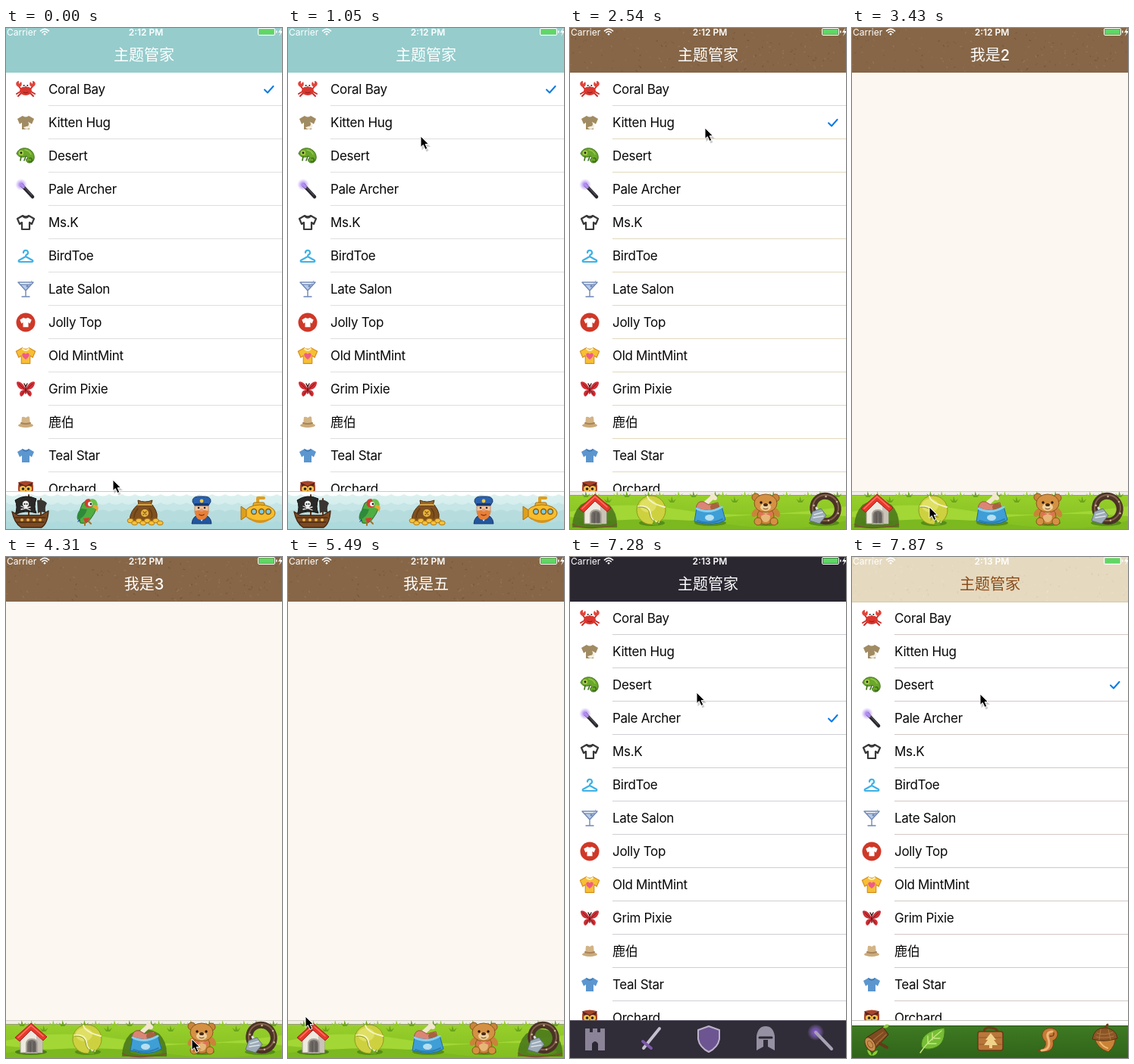
An HTML page for the animation above (8000 ms loop, 364 by 662 pixels).

```html
<!DOCTYPE html>
<html lang="zh">
<head>
<meta charset="utf-8">
<title>主题管家</title>
<style>
html, body { margin: 0; width: 364px; height: 662px; overflow: hidden; background: #fff; }
svg { display: block; font-family: Inter, "Noto Sans CJK SC", "Noto Sans CJK JP", sans-serif; }
.row { font-size: 17px; letter-spacing: -.3px; fill: #080808; }
.title { font-size: 20px; font-weight: 500; text-anchor: middle; }
.clock { font-size: 12px; font-weight: 600; text-anchor: middle; }
</style>
</head>
<body>
<script>
const LOOP = 8000;
const TABS = [33, 107, 183, 258, 333];

// Shape helpers
const p = (d, fill, more = '') => `<path d="${d}" fill="${fill}" ${more}/>`;
const s = (d, color, w = 1, more = '') =>
  p(d, 'none', `stroke="${color}" stroke-width="${w}" stroke-linecap="round" stroke-linejoin="round" ${more}`);
const e = (x, y, rx, ry, fill, more = '') => `<ellipse cx="${x}" cy="${y}" rx="${rx}" ry="${ry}" fill="${fill}" ${more}/>`;
const c = (x, y, r, fill, more) => e(x, y, r, r, fill, more);
const r = (x, y, w, h, fill, more = '') => `<rect x="${x}" y="${y}" width="${w}" height="${h}" fill="${fill}" ${more}/>`;
const g = (x, y, body, k = 1) => `<g transform="translate(${x} ${y}) scale(${k})">${body}</g>`;
const group = (id, body) => `<g id="${id}">${body}</g>`;
const ink = (color, w = 1) => `stroke="${color}" stroke-width="${w}" stroke-linejoin="round"`;
const fade = (id, a, b) => `<linearGradient id="${id}" x2="0" y2="1"><stop stop-color="${a}"/><stop offset="1" stop-color="${b}"/></linearGradient>`;

let seed = 7;
const rnd = n => (seed = (seed * 16807) % 2147483647) / 2147483647 * n;
const many = (n, make) => Array.from({ length: n }, (_, i) => make(i)).join('');

const TEE = 'M-4-9Q0-6 4-9L11-5 8 2 5 0V9H-5V0L-8 2-11-5Z';
const HEART = 'M0 5C-9-1-3-6 0-2 3-6 9-1 0 5Z';

const rows = [
  ['Coral Bay',
    s('M-7 3l-5 3M-6 5l-4 4M7 3l5 3M6 5l4 4M-6 0l-4-5M6 0l4-5', '#c92d28', 2) +
    p('M-9-3C-15-5-13-11-9-11L-9-7-6-10C-4-6-6-3-9-3Z', '#e0443a') +
    p('M9-3C15-5 13-11 9-11L9-7 6-10C4-6 6-3 9-3Z', '#e0443a') +
    e(0, 2, 8, 6, '#d8372f') + c(-2.5, -5, 2, '#fff') + c(2.5, -5, 2, '#fff') +
    c(-2.3, -5, 1, '#222') + c(2.3, -5, 1, '#222') + s('M-3 4Q0 6 3 4', '#8c1a18')],
  ['Kitten Hug', p(TEE, '#a18b62') + p('M3-1A5 5 0 1 1-3 6 6 6 0 0 0 3-1Z', '#f4eee0') + c(1, 2, 3, '#a18b62')],
  ['Desert',
    p('M-12-3C-9-12 3-12 8-6 13-1 12 8 6 9 0 10-1 3 3 3L1 0C-4 3-9 2-12-3Z', '#6aa72a', ink('#3c6e1a')) +
    s('M5 3a2.5 2.5 0 1 1-1 4M-6 1l-1 5M0 1l-2 5', '#3c6e1a', 1.6) +
    c(-6, -4, 3.2, '#a7cf4a') + c(-6, -4, 1.4, '#222') + s('M-1-8Q5-7 7-2', '#96c84a', 1.5)],
  ['Pale Archer',
    c(-6, -6, 8, 'url(#glow)') + s('M-5-5L9 10', '#29272e', 4.5) + s('M-6-6l3 3', '#b18cf0', 4) + s('M-2-3L8 8', '#68646f')],
  ['Ms.K', p(TEE, '#fff', ink('#38383b', 2.2)) + s('M-4-8Q0-4 4-8', '#38383b', 1.6)],
  ['BirdToe', s('M-3-4a3 3 0 1 1 4 2.6Q0-1 0 1L-9 6Q-10 8-8 8H8Q10 8 9 6L0 1', '#3eb1e6', 2.2)],
  ['Late Salon',
    p('M-6-5H6L0 2Z', '#b7cbe9') + s('M-10-9H10L0 2ZM0 2V9M-5 10H5M-7-6H7', '#6f88b7', 1.4) +
    s('M3-3L8-11', '#8da5cc') + c(2, -4, 1.5, '#6f88b7')],
  ['Jolly Top', c(0, 0, 12.5, '#cf3828') + g(0, 0, p(TEE, '#fff'), .7)],
  ['Old MintMint', g(0, 0, p(TEE, '#f7bf35', ink('#d58d1c')), 1.15) + s('M-4-9Q0-5 4-9', '#fff2b8', 2) + p(HEART, '#ef5b8a')],
  ['Grim Pixie',
    p('M0 0C-4-9-10-11-12-9-12-3-8 1-2 1-9 2-9 8-6 10-3 9-1 5 0 2 1 5 3 9 6 10 9 8 9 2 2 1 8 1 12-3 12-9 10-11 4-9 0 0Z', '#cf2f35') +
    s('M-9-7L-2 0M9-7L2 0M-5 7l3-4M5 7l-3-4', '#7d1820') + s('M0-3V6M0-3l-2-4M0-3l2-4', '#3a1414', 1.4)],
  ['鹿伯', p('M-6 3L-5-7Q-2-8 0-6 3-9 5-7L6 3Z', '#d3b486') + e(0, 4, 10, 3, '#cbaa7a') + s('M-6 1Q0 3 6 1', '#a88456', 2)],
  ['Teal Star', p(TEE, '#5c96cf') + s('M-4-8Q0-4 4-8', '#3f77b2', 1.4)],
  ['Orchard',
    p('M-9-9Q0-12 9-9 12 2 7 10H-7Q-12 2-9-9Z', '#a8432a') + p('M-10-9L0-4 10-9 7-2H-7Z', '#5c2420') +
    c(-4, 0, 4, '#f6c04e') + c(4, 0, 4, '#f6c04e') + c(-3.5, 0, 1.8, '#222') + c(3.5, 0, 1.8, '#222') + p('M-2 3H2L0 7Z', '#f09a2c')]
];

const surfIcons = [
  s('M-3-20V9M13-15V8', '#5b3518', 2) + p('M-21-13Q-8-22 7-15 3-4 7 4-8-1-21 6-17-4-21-13Z', '#2b2927', ink('#121110')) +
  p('M8-13Q16-15 21-9 17-3 20 4 14 1 9 4Z', '#393532') +
  c(-7, -8, 4.2, '#eee') + r(-9, -5, 4, 3, '#eee') + c(-8.5, -8, 1.1, '#222') + c(-5.5, -8, 1.1, '#222') + s('M-13-1L-1-4M-13-5L-1 0', '#eee', 1.3) +
  p('M-25 2L-17 7H13L23 1Q22 18 14 23H-13Q-22 17-25 2Z', '#7b4a22', ink('#43250e', 1.3)) +
  s('M-21 10H19M-18 16H17', '#4d2c12', 1.3) + many(4, i => c(-12 + i * 8, 13, 2, '#e6ae4a')),
  p('M-8 6L-13 16-5 13Z', '#2c62a0') + p('M-6-9Q5-19 12-8 14-1 5 11 0 19-9 17-13 5-6-9Z', '#50ad40', ink('#276c29')) +
  p('M3-14Q13-17 14-6L7-7Z', '#6bc24b') + p('M-8-2Q-15 5-13 13-3 10 0-1Z', '#2f8a3a') +
  p('M8-7Q18-8 13 3 12-3 7-3Z', '#e7a62f') + p('M-3-6Q-5-15 3-15L7-6Q2-1-3-6Z', '#d93b30') +
  c(4, -8, 3, '#fff') + c(5, -8, 1.4, '#222') + p('M-5 11L4 10-2 18Z', '#d93b30') + s('M2 15l3 3M-3 17v3', '#a87222', 2),
  p('M-8-8Q-19 0-20 13-7 20 14 15 20 6 10-7Z', '#80501f', ink('#523110')) + p('M-9-13Q0-9 10-13L8-6H-8Z', '#96642c', ink('#523110')) +
  s('M-9-7H9', '#d2a34c', 2) + s('M-9-2Q-14 4-14 10M6-2Q11 4 9 10', '#653c14', 1.5) +
  c(0, 4, 5, '#e9b63c') + s('M-2 2l4 4M2 2l-4 4', '#8a5a16', 1.3) +
  many(8, i => e(-19 + i * 5.6, 14 + (i % 2) * 3, 4, 2.8, '#f5c238', ink('#b57b16'))),
  p('M-13 18Q-12 6 0 6T13 18Z', '#24569c', ink('#173a70')) + p('M-4 8H4L0 15Z', '#fff') +
  p('M-9-8H9V3Q7 11 0 11T-9 3Z', '#f4c39b', ink('#b67a53', .8)) + p('M-9 1Q0-1 9 1 8 12 0 13T-9 1Z', '#e78036') +
  p('M-12-11Q-13-19 0-18 13-19 12-11L9-6H-9Z', '#2b62ae', ink('#173a70')) + r(-9, -9, 18, 3, '#173a70') + c(0, -12, 2.4, '#f3c642') +
  c(-4, -3, 1.3, '#222') + c(4, -3, 1.3, '#222') + e(0, 0, 2.5, 2, '#e69a76') + s('M-3 6Q0 8 3 6', '#842f1c', 1.5),
  s('M-1-8V-16H7', '#df9f1d', 4) + r(-7, -10, 15, 10, '#edb126', ink('#a8700f') + ' rx="2"') +
  e(2, 4, 20, 11, '#f7bd2c', ink('#a8700f')) + p('M-16 0L-23-5V13L-16 8Z', '#df9f1d', ink('#a8700f')) +
  p('M-14 9Q2 18 19 9 12 17 2 17T-14 9Z', '#d7931b') + [-6, 4, 13].map(x => c(x, 2, 3.4, '#81cbe2', ink('#8c5b0b', 1.5))).join('')
];

const yardIcons = [
  e(0, 17, 21, 4, '#4c7d18') + p('M-14-4L0-15 15-4V18H-14Z', '#eee9df', ink('#a29a8d')) + p('M7-8L15-4V18H7Z', '#c9c3b8') +
  p('M-6 18V7Q-6 0 1 0T8 7V18Z', '#706b66', ink('#aaa59b', 2)) + s('M-1 4V17M4 4V17', '#514d49') +
  p('M0-21L21-3 16 2 0-12-15 3-21-2Z', '#e8382d', ink('#a51f1b')) + s('M-17-2L0-18 16-4', '#ff7762', 1.5),
  e(1, 17, 17, 4, '#568d17') + c(0, 0, 19, '#ced13f', ink('#8d981d')) + e(-4, -6, 11, 9, '#dfe063') +
  s('M-17-5Q-2-7-1 4T10 16M-5-18Q-2-9 18-4', '#f4f3c5', 2) + s('M-17-4Q-3-5-2 5T9 17', '#8e9926') +
  p('M1 20L4 12 6 18 10 13 9 21Z', '#68a51c'),
  e(2, 17, 21, 4, '#568d17') + s('M-4-9L6-18', '#f2e7cf', 6) + c(5, -19, 3, '#f2e7cf') + c(8, -16, 3, '#f2e7cf') +
  p('M-17-1Q-16-13-7-11L0-7 12-10 15 2Z', '#db8574', ink('#a45348')) + e(8, -4, 6, 5, '#a9623e') +
  p('M-16-3Q0 5 17-5L22 13Q7 23-19 15Z', '#3f9ed5', ink('#206a9c')) + s('M-16-2Q0 6 17-4', '#87d0ef', 3) +
  e(1, 10, 6, 4, '#b6dff0') + s('M-15 14Q2 20 18 12', '#2b7fb4', 2),
  e(1, 17, 16, 4, '#568d17') + c(-13, -17, 5, '#c98439', ink('#8c541d')) + c(13, -16, 5, '#c98439', ink('#8c541d')) +
  e(-13, 3, 4, 7, '#c98439', 'transform="rotate(40 -13 3)"') + e(14, 3, 4, 7, '#c98439', 'transform="rotate(-35 14 3)"') +
  e(0, 8, 11, 11, '#c98439', ink('#8c541d')) + e(0, 9, 6, 7, '#e6b777') +
  e(0, -9, 15, 12, '#d59143', ink('#8c541d')) + e(0, -4, 7, 5, '#efd09c') + e(0, -7, 3, 2, '#482a15') +
  c(-6, -10, 1.7, '#24150a') + c(6, -10, 1.7, '#24150a') + s('M-3-2Q0 0 3-2', '#754319') +
  p('M-8 2L0 5 9 2 8 8 0 5-7 8Z', '#e2705b') + c(-10, 15, 5, '#d59143', ink('#8c541d')) + c(11, 15, 5, '#d59143', ink('#8c541d')),
  e(2, 17, 20, 4, '#568d17') + e(4, -2, 16, 17, 'none', 'stroke="#4b3226" stroke-width="9" transform="rotate(-28 4 -2)"') +
  e(4, -3, 17, 17, 'none', 'stroke="#80604a" stroke-width="2" transform="rotate(-28 4 -3)"') +
  many(6, i => c(5 + 17 * Math.cos(i - 1.6), -2 + 16 * Math.sin(i - 1.6), 1.3, '#c6b28f')) +
  s('M-8-3L-6 1', '#ddd', 3) + p('M-13 2L-2-2 5 7-4 18-17 14Z', '#9cabb7', ink('#64717c')) + s('M-11 6L0 3M-12 10L1 8', '#dce4e9', 1.4)
];

const duskIcons = [
  p('M-13 15V-14H-7V-9H-3V-14H3V-9H7V-14H13V15Z', '#8b8498') + p('M-4 15V6Q0 0 4 6V15Z', '#2b2733'),
  s('M-10 12L11-14', '#c5c0d0', 4) + s('M-11 3L0 12', '#7b5aa8', 4),
  p('M0-17L14-12V0Q12 11 0 17-12 11-14 0V-12Z', '#6d5591', ink('#bcb3cb', 2)),
  p('M-12 15V-4Q-10-17 0-17T12-4V15L3 10V1H-3V10Z', '#9690a3') + s('M-8-2H8', '#2b2733', 3),
  c(-9, -9, 11, 'url(#glow)') + s('M-9-9L12 13', '#a8a2b5', 4)
];

const woodIcons = [
  p('M-14-2L8-16 15-6-5 15Z', '#7f4b22', ink('#482610')) + s('M-7 3L8-9M-2 8L12-6', '#a66a34', 1.5) +
  e(-9, 7, 6, 10, '#c98e4c', 'stroke="#5d3515" transform="rotate(-30 -9 7)"') + e(-9, 7, 3, 5, 'none', 'stroke="#8c5727" transform="rotate(-30 -9 7)"') +
  s('M4 6l9 5', '#633a18', 4) + p('M-7 22Q-8 15-13 14-12 21-7 22 0 22 1 15-5 16-7 22ZM8-15Q10-21 16-19 14-13 8-15Z', '#8dce38'),
  p('M-15 11Q-19-10 15-15 17 10-4 13-10 14-15 11Z', '#76bd35', ink('#3d7a19')) +
  s('M-17 18Q-8 4 11-11M-7 6V-4M-1 1V-8M-6 6H4M1-1H9', '#c6e881', 1.4),
  s('M-9-10Q-8-16 0-15T9-10', '#6b3d18', 3) + r(-17, -10, 33, 25, '#b8773a', ink('#693a16', 1.5) + ' rx="3"') +
  s('M-15-2H14M-15 7H14', '#945824', 1.2) + p('M0-8L7 1H4L9 8H2V12H-2V8H-9L-4 1H-7Z', '#f0d28a'),
  p('M-13 15Q-1 14-3 3C-12-5-5-17 7-14 17-11 13 0 7 2 10 14-1 20-13 15Z', '#c77b36', ink('#77401a')) +
  s('M-8 15Q5 14 1 0-3-9 6-10', '#edb878', 3) + s('M8-8Q9-3 3-4', '#77401a', 1.5),
  p('M-13-1Q-10 12 5 17 15 9 14-3Z', '#c98236', ink('#70401a')) + s('M-6 4Q-2 10 4 12', '#eebc70', 2) +
  p('M-16 0Q-14-15 1-15 16-13 17-1 0 5-16 0Z', '#8c5526', ink('#54300f')) + s('M1-15L4-19', '#70401a', 3) +
  s('M-11-3Q0 0 12-4M-10-8Q0-4 11-9M-5-13L-7 1M5-13L8 1', '#b07a42')
];

const icons = list => list.map((art, i) => g(TABS[i], 25, art)).join('');
const speckle = (n, a, b) => many(n, () => s(`M${rnd(364)} ${rnd(58)}l${rnd(4) - 2} ${rnd(2)}`, rnd(1) < .6 ? a : b, .5 + rnd(.8), 'opacity=".45"'));
const wave = (y, h, fill) => p(`M0 ${y}` + many(22, () => `q8.5 ${h} 17 0`) + 'V50H0Z', fill);
const theme = (id, head, bar) => group(id, head + g(0, 612, bar));

const themes =
  theme('surf', r(0, 0, 364, 59, '#96cccc'),
    r(0, 0, 364, 50, '#fff') + wave(4, 5, 'url(#foam)') + wave(15, 6, '#c5e5e6') + wave(27, -5, '#b7dcde') + wave(39, 5, '#addadd') +
    r(0, 0, 364, 1, '#c4cccc') + icons(surfIcons)) +
  theme('yard', r(0, 0, 364, 59, '#866647') + speckle(190, '#5e432b', '#a98966'),
    r(0, 0, 364, 50, 'url(#grass)') + p('M0 27Q70 11 150 25T364 20V33Q270 26 190 36T0 34Z', '#a2d735') +
    p('M0 43Q120 31 210 44T364 39V50H0Z', '#7cb81f') + r(0, 0, 364, 5, '#f0ede7') + r(0, 0, 364, 1, '#d0cbc3') + r(0, 5, 364, 1, '#9a9b7e') +
    many(26, i => p(`M${i * 14 + rnd(8)} ${i % 3 ? 8 : 15}l-3-5 4 3 1-6 2 6 4-3-3 5Z`, i % 2 ? '#69a51b' : '#91cc2b')) +
    group('mound', p('M3 48Q3 29 14 18 33 6 52 18 63 29 62 48Z', '#47751a', 'opacity=".85"') + s('M4 44Q10 49 33 48T61 44', '#79572c', 2)) +
    icons(yardIcons)) +
  theme('dusk', r(0, 0, 364, 59, '#2a2731'), r(0, 0, 364, 50, '#302c38') + r(0, 0, 364, 1, '#55505f') + icons(duskIcons)) +
  theme('wood', r(0, 0, 364, 59, '#e5d9bf') + speckle(150, '#cdbd99', '#f4ebd8') + r(0, 59, 364, 1, '#d5c8ab'),
    r(0, 0, 364, 50, '#fff') + r(0, 0, 364, 1, '#c8c2bb') + r(0, 7, 364, 43, 'url(#moss)') + r(0, 7, 364, 1, '#255513') + icons(woodIcons));

const list = r(0, 59, 364, 553, '#fff') +
  group('rules', many(12, i => `<path d="M56 ${102.5 + 44 * i}H364"/>`)) +
  group('press', r(0, 102, 364, 45, '#d9d9d9')) +
  rows.map(([name, art], i) => g(26, 81 + 44 * i, art) + `<text class="row" x="56" y="${87 + 44 * i}">${name}</text>`).join('') +
  group('check', s('M341 81.5l4 4 7.5-8.5', '#0b7ae3', 2));

const titles = ['主题管家', '我是2', '我是3', '我是4', '我是五'];
const status = '<text x="1" y="10" font-size="12" fill="#fff">Carrier</text>' +
  s('M45.5 3.8Q51-1.2 56.5 3.8M47.8 6Q51 3 54.2 6', '#fff', 1.6) + c(51, 8.3, 1.3, '#fff') +
  r(332.5, .5, 22, 9, 'none', 'stroke="#fff" rx="1.5"') + r(333.5, 1.5, 20, 7, '#5fd765') + r(356, 3.5, 1.5, 3, '#fff') +
  p('M363 0L359 6H362L360 11 365 4H362Z', '#fff') +
  ['2:12 PM', '2:13 PM'].map((t, i) => `<text id="clock${i}" class="clock" x="184.5" y="10" fill="#fff">${t}</text>`).join('');

const arrow = p('M1.5 3V18.5L5 15 7.5 20.5 10.5 19 8 14H13Z', '#000', 'opacity=".2"') +
  p('M0 0V14.5L3.3 11.5 6 17.5 8.8 16.2 6.2 10.5H10.5Z', '#000', ink('#fff'));

document.body.innerHTML = `<svg width="364" height="662" viewBox="0 0 364 662"><defs>
${fade('foam', '#dcf1f0', '#c5e5e6')}${fade('grass', '#9bd22d', '#82be20')}${fade('moss', '#3f7a23', '#2f6419')}
<radialGradient id="glow"><stop stop-color="#8d55ee"/><stop offset="1" stop-color="#b796f5" stop-opacity="0"/></radialGradient></defs>
${list}${group('blank', r(0, 59, 364, 553, '#fcf8f1'))}${themes}${status}
<g id="heading">${titles.map((t, i) => `<text id="title${i}" class="title" x="182" y="43">${t}</text>`).join('')}</g>
${group('cursor', arrow)}</svg>`;

// Held keyframes, cued in milliseconds
const css = [];
const track = (id, prop, cues) => {
  const keys = cues.map(([t, v]) => `${t / LOOP * 100}%{${prop}:${v}}`).join('');
  css.push(`@keyframes ${id}-${prop}{${keys}}`);
  return `${id}-${prop} ${LOOP}ms step-end infinite`;
};
const play = (id, ...anims) => css.push(`#${id}{animation:${anims.join()}}`);
const move = (id, cues) => track(id, 'transform', cues.map(([t, x, y]) => [t, `translate(${x}px,${y}px)`]));
const show = (id, ...spans) => play(id, track(id, 'opacity',
  [...(spans[0][0] ? [[0, 0]] : []), ...spans.flatMap(([a, b]) => b < LOOP ? [[a, 1], [b, 0]] : [[a, 1]])]));

show('surf', [0, 2390]);
show('yard', [2390, 6830]);
show('dusk', [6830, 7730]);
show('wood', [7730, LOOP]);
show('blank', [3430, 6080]);
show('title0', [0, 3430], [6080, LOOP]);
show('title1', [3430, 4170]);
show('title2', [4170, 4610]);
show('title3', [4610, 5190]);
show('title4', [5190, 6080]);
show('clock0', [0, 5790]);
show('clock1', [5790, LOOP]);
play('heading', track('heading', 'fill', [[0, '#fff'], [7730, '#8a4a17']]));
play('rules', track('rules', 'stroke', [[0, '#dedede'], [2390, '#e2d8bd'], [6830, '#d0ced4'], [7730, '#d2c8c4']]));
play('check', move('check', [[0, 0, 0], [2390, 0, 44], [6830, 0, 132], [7730, 0, 88]]));
play('press', track('press', 'opacity', [[0, 0], [2090, 1], [2390, .5], [2540, 0], [7730, .5], [7870, 0]]),
  move('press', [[0, 0, 0], [6830, 0, 44]]));
play('mound', move('mound', [[0, 0, 0], [3580, 75, 0], [4310, 150, 0], [4760, 225, 0], [5340, 300, 0], [6230, 0, 0]]));

// Each pointer leg: start time, then x, y per 147 ms sample
const legs = [
  [0, 141, 597, 137, 585, 128, 530, 127, 450, 136, 345, 157, 245, 176, 178, 175, 143],
  [1350, 179, 93], [1640, 177, 115, 178, 132],
  [2830, 165, 250, 125, 460, 100, 600, 102, 633], [3575, 120, 636, 165, 637, 181, 637],
  [4310, 245, 637, 256, 637], [4755, 280, 638, 325, 639, 341, 640],
  [5340, 180, 620, 23, 607, 19, 622, 20, 632],
  [6230, 90, 420, 167, 205], [7280, 167, 179, 169, 181]
];
play('cursor', move('cursor', legs.flatMap(([t, ...xy]) =>
  Array.from({ length: xy.length / 2 }, (_, i) => [t + i * 148, xy[i * 2], xy[i * 2 + 1]]))));
document.head.appendChild(document.createElement('style')).textContent = css.join('\n');
</script>
</body>
</html>
```
